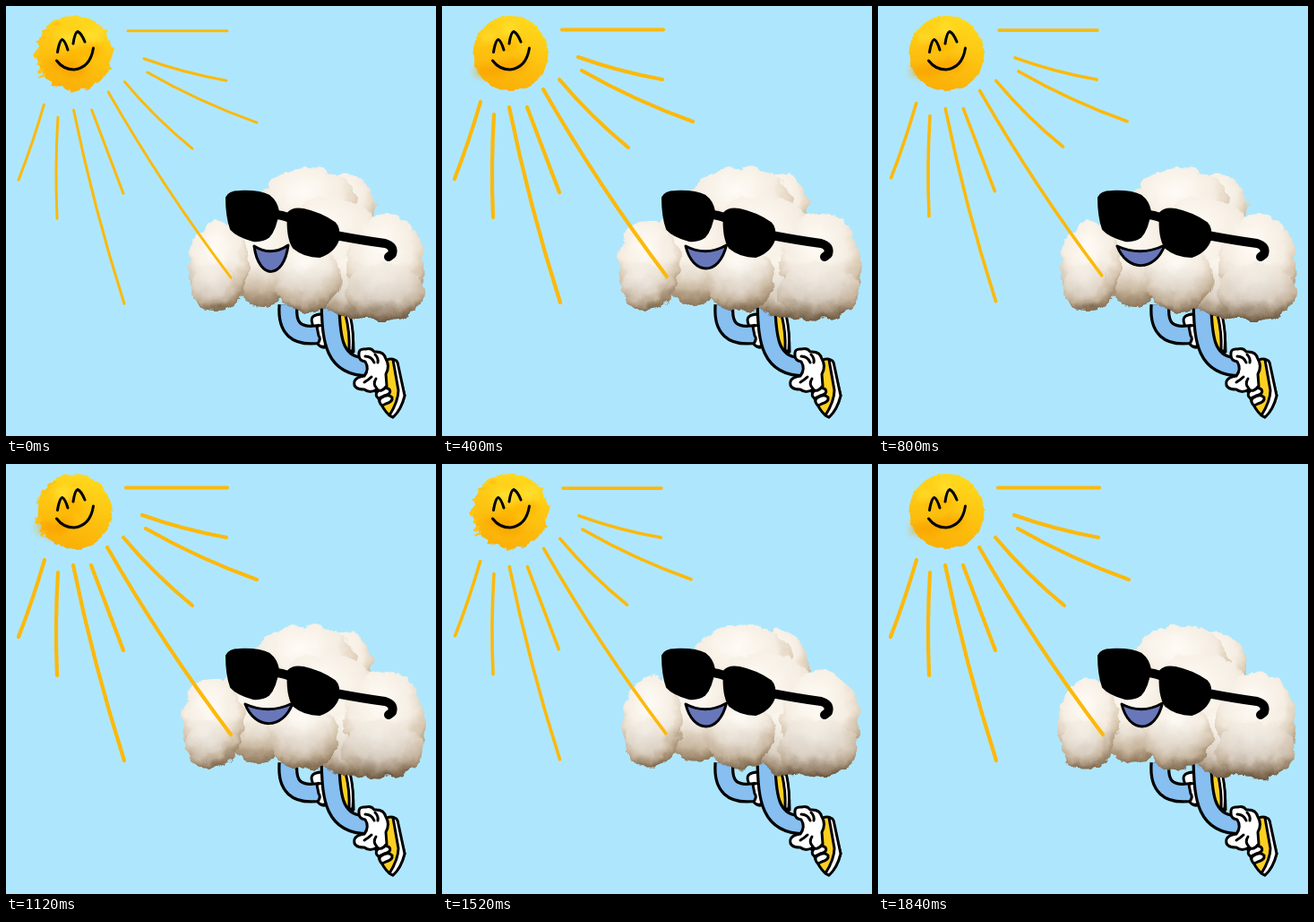
An HTML page for the animation above (1920 ms loop, 480x480 px).

```html
<!DOCTYPE html>
<html lang="en">
<head>
<meta charset="utf-8">
<title>Sunny cloud</title>
<style>
  html, body { margin: 0; width: 100%; height: 100%; overflow: hidden; background: #aee7fd; }
  svg { display: block; width: 100vw; height: 100vh; }
</style>
</head>
<body>
<svg viewBox="0 0 480 480" stroke-linecap="round" stroke-linejoin="round">
  <defs id="defs">
    <radialGradient id="puff" cx=".45" cy=".3" r=".75">
      <stop offset="0" stop-color="#fffcf6"/>
      <stop offset=".52" stop-color="#f5ede2"/>
      <stop offset=".76" stop-color="#dccbb4"/>
      <stop offset="1" stop-color="#8d7353"/>
    </radialGradient>
    <linearGradient id="under" x2="0" y2="1">
      <stop offset="0" stop-color="#5d452b" stop-opacity="0"/>
      <stop offset=".6" stop-color="#5d452b" stop-opacity=".2"/>
      <stop offset="1" stop-color="#402d1a" stop-opacity=".65"/>
    </linearGradient>
    <linearGradient id="glow" x1=".6" x2=".35" y2="1">
      <stop offset="0" stop-color="#ffd91c"/>
      <stop offset="1" stop-color="#fbae06"/>
    </linearGradient>
    <clipPath id="shape"></clipPath>
    <filter id="soft" x="-80%" y="-80%" width="260%" height="260%"><feGaussianBlur stdDeviation="4"/></filter>
  </defs>

  <g stroke="#000" stroke-width="3">
    <path fill="#fccf22" d="M368 344H383Q388 364 388 386L381 391Q374 372 368 344Z"/>
    <path fill="#fff" d="M379 345H384Q389 366 387 385H383Q384 364 379 345Z"/>
    <path fill="#fff" d="M342 355Q339 347 346 345Q354 342 358 349L361 379Q353 384 348 377Z"/>
    <g class="tube" data-d="M315 334C313 359 323 371 352 366"></g>
    <path fill="#fff" d="M347 358Q352 355 357 358L360 378Q352 383 348 377Q352 371 349 368Z"/>
    <path fill="#fccf22" d="M425 395Q433 392 436 398L445 435Q441 451 432 459Q421 455 412 428Z"/>
    <path fill="#fff" d="M432 395Q437 394 438 402L445 435Q441 451 432 459L428 457Q438 441 438 429Z"/>
    <path fill="#fff" d="M415 430Q423 424 428 428Q431 433 422 435L416 438Q411 435 415 430ZM418 438Q427 432 431 437Q432 442 424 444L420 446Q415 442 418 438Z"/>
    <g class="tube" data-d="M362 334C363 374 366 403 405 403"></g>
    <path fill="#fff" d="M394 390Q393 382 401 383Q408 381 411 386Q422 385 424 394Q429 402 424 411L425 424Q419 432 414 428Q406 433 400 428Q387 428 389 419Q391 414 400 413Q406 405 401 397Q394 396 394 390Z"/>
    <path fill="none" d="M401 391Q408 391 411 398M412 389Q416 393 415 398M400 420Q405 417 408 414M414 427Q409 422 413 416"/>
  </g>

  <g id="clouds"></g>
  <g id="rays" fill="none" stroke="#fdb90a"></g>
  <g id="suns"></g>
  <path fill="none" stroke="#000" stroke-width="3" d="M57.500 51.500Q60 37 63 37.500Q66 39 69 49M75 42Q77 29 80 28.500Q84 30 88 40M56.500 61Q64 71 76 71Q94 69 97.500 47"/>

  <path id="mouth" fill="#6877ba" stroke="#000" stroke-width="3"/>
  <g stroke="#000" stroke-width="2">
    <path d="M246 214Q249 207 260 207Q283 206 294 212Q302 218 304 229Q301 250 293 258Q286 263 276 262Q258 257 251 249Q246 235 246 214Z"/>
    <path d="M315 231Q320 225 332 227Q351 231 367 242Q373 248 371 261Q366 275 350 280Q333 280 321 270Q313 258 315 231Z"/>
    <path fill="none" stroke-width="10" d="M300 233Q308 233 317 237M368 256Q400 262 423 265Q434 268 431 277L427 280"/>
  </g>
</svg>

<script>
const STEP = 80, FRAMES = 24, TURN = 2 * Math.PI;
const $ = id => document.getElementById(id);

function add(parent, tag, attrs) {
  const el = document.createElementNS('http://www.w3.org/2000/svg', tag);
  for (const k in attrs) el.setAttribute(k, attrs[k]);
  return parent.appendChild(el);
}

const make = (count, build) => Array.from({ length: count }, (_, k) => build(k));

function seeded(s) {
  return (lo, hi) => {
    s = (s * 16807) % 2147483647;
    return lo + (hi - lo) * s / 2147483647;
  };
}

// Ragged edge made by seeded noise
function roughen(id, seed, freq, scale) {
  const f = add($('defs'), 'filter', { id, 'color-interpolation-filters': 'sRGB' });
  add(f, 'feTurbulence', { type: 'fractalNoise', baseFrequency: freq, numOctaves: 3, seed, result: 'n' });
  add(f, 'feDisplacementMap',
    { in: 'SourceGraphic', in2: 'n', scale, xChannelSelector: 'R', yChannelSelector: 'G' });
  return `url(#${id})`;
}

// Legs: a blue stroke inside a wider black one
for (const g of document.querySelectorAll('.tube'))
  for (const [stroke, width] of [['#000', 23], ['#86bff0', 16.5]])
    add(g, 'path', { d: g.dataset.d, fill: 'none', stroke, 'stroke-width': width, 'stroke-linecap': 'butt' });

// Cloud lobes from back to front: cx, cy, rx, ry
const LOBES = [
  [376, 226, 36, 38], [338, 224, 56, 43], [360, 275, 66, 62], [287, 276, 46, 58], [390, 312, 44, 38],
  [424, 290, 44, 57], [422, 320, 44, 32], [237, 290, 34, 50], [232, 314, 25, 26], [336, 304, 38, 38]];
const lobes = (parent, fill) =>
  LOBES.forEach(([cx, cy, rx, ry]) => add(parent, 'ellipse', { cx, cy, rx, ry, fill }));
lobes($('shape'), '#000');

const clouds = make(5, k => {
  const left = 3.5 * (Math.cos(TURN * k / 5) - 1), lift = -0.6 * k;
  const sx = 1 + (lift - left) / 266;
  const g = add($('clouds'), 'g', {
    transform: `translate(${203 + left - 203 * sx} ${lift}) scale(${sx} 1)`,
    filter: roughen('fluff' + k, 4 + k * 7, 0.07, 11)
  });
  lobes(g, 'url(#puff)');
  add(g, 'rect', { x: 200, y: 285, width: 272, height: 70, fill: 'url(#under)', 'clip-path': 'url(#shape)' });
  return g;
});

// Rays: start, end, sag
const RAYS = [
  [134, 26.5, 247, 26.5, 0], [152, 57, 246, 82, 4], [156, 72, 280, 129, 6],
  [131, 82, 208, 158, 5], [113, 93, 251, 302, 8], [95, 113, 131, 208, 0],
  [75, 113, 132, 331, 6], [58, 121, 57, 236, 3], [43, 107, 14, 193, -2]];

const rays = make(3, k => {
  const wear = 2 - k, trim = k % 2 * 2;
  const d = RAYS.map(([x, y, u, w, sag]) => {
    const len = Math.hypot(u - x, w - y), dx = (u - x) / len, dy = (w - y) / len;
    const cx = (x + u) / 2 - dy * sag, cy = (y + w) / 2 + dx * sag;
    return `M${x + dx * wear} ${y + dy * wear}Q${cx} ${cy} ${u - dx * trim} ${w - dy * trim}`;
  }).join('');
  return add($('rays'), 'path', { d, 'stroke-width': 3 + 0.6 * k, transform: `translate(0 ${wear * 0.6})` });
});

// Sun: soft paint spots, with dry brush strokes on the left rim
const PAINT = ['#ffdf2e', '#ffb800', '#f9a606'];
const suns = make(3, k => {
  const rnd = seeded(71 + 40 * k);
  const g = add($('suns'), 'g', { filter: roughen('edge' + k, 3 + 9 * k, 0.12, 8 - 2 * k) });
  add(g, 'circle', { cx: 76.5, cy: 53, r: 42, fill: 'url(#glow)' });
  for (let i = 0; i < 12 && k < 2; i++) {
    const a = rnd(0.4, 0.68) * TURN, x = 76 + 39 * Math.cos(a), y = 53 + 39 * Math.sin(a);
    add(g, 'path', { d: `M${x} ${y}l${rnd(-6, -2)} ${rnd(1, 5)}`, stroke: '#ffc316', 'stroke-width': 3 });
  }
  const spots = add(g, 'g', { filter: 'url(#soft)' });
  for (let i = 0; i < 6; i++) {
    const shade = i % 3;
    add(spots, 'ellipse', {
      cx: rnd(52, 100), cy: 30 + 20 * shade + rnd(-6, 6), rx: rnd(8, 18), ry: rnd(4, 8), fill: PAINT[shade]
    });
  }
  return g;
});

// gape runs from 0 (smile) to 1 (open)
function mouth(gape) {
  const l = 267 + 10 * gape, r = 320 - 5 * gape, low = 297 + 9 * gape, inset = 11 - 6 * gape;
  return `M${l} 268Q${(l + r) / 2} 280 ${r} 267C${r - inset} ${low} ${l + inset} ${low} ${l} 268Z`;
}

const show = (list, k) => list.forEach((el, i) => { el.style.display = i === k ? '' : 'none'; });

let last = -1;
function draw(ms) {
  const n = Math.floor(ms / STEP) % FRAMES;
  if (n === last) return;
  last = n;
  show(rays, n % 3);
  show(suns, (n >> 1) % 3);
  show(clouds, (n >> 1) % 5);
  $('mouth').setAttribute('d', mouth((1 + Math.cos(TURN * n / 4)) / 2));
}

const start = performance.now();
function tick() {
  draw(performance.now() - start);
  requestAnimationFrame(tick);
}
tick();
</script>
</body>
</html>
```
